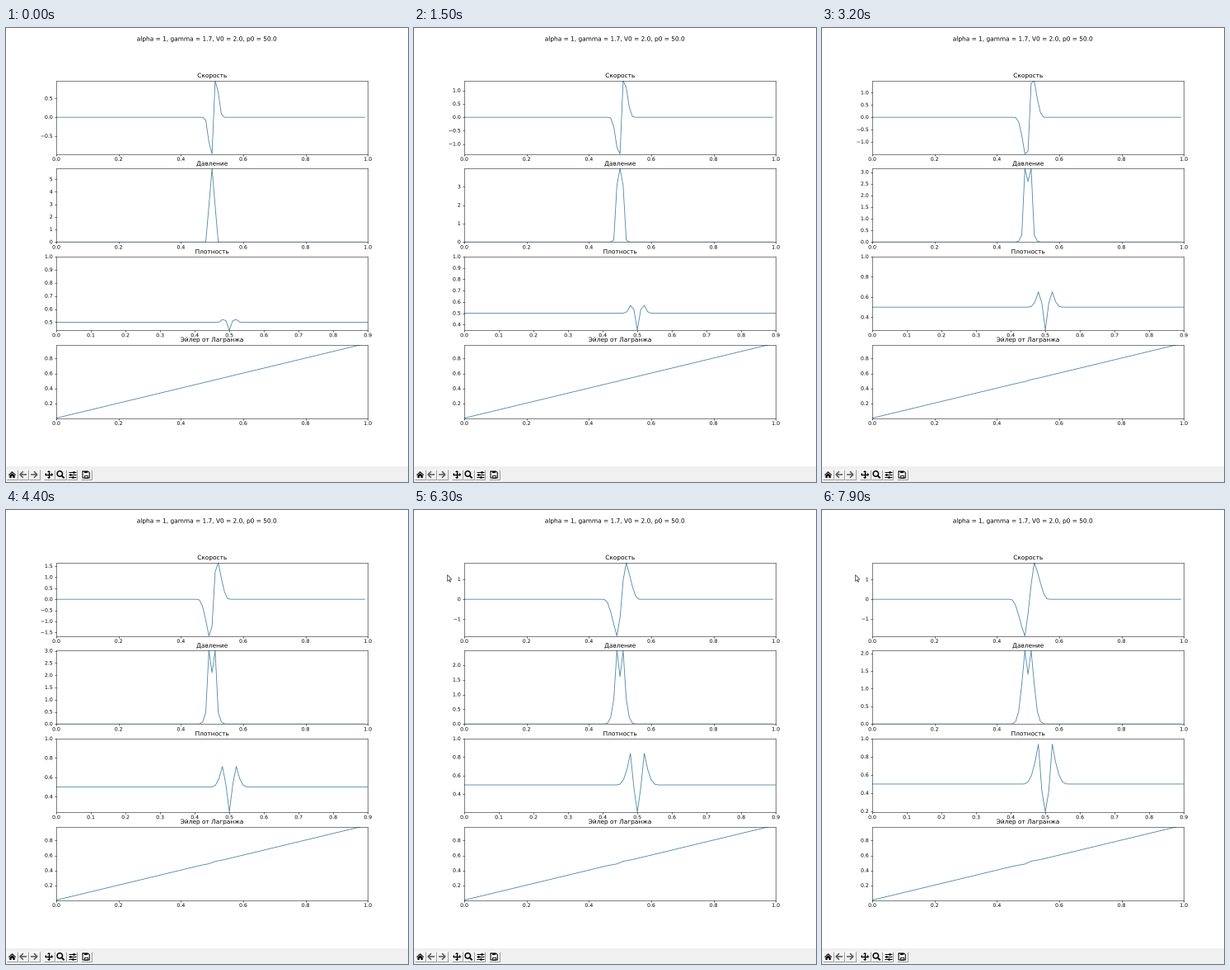
These frames come from a looping animation (488 by 550 pixels, 8000 ms). A matplotlib script:

```python
import numpy as np
import matplotlib.pyplot as plt
from matplotlib import patheffects
from matplotlib.animation import FuncAnimation
from matplotlib.patches import Circle, Polygon, Rectangle

W, H, BAR = 488, 550, 19
DPI = 64
PX = 72 / DPI          # points per pixel
S = 0.6154 * PX        # shrink factor of the plot window
FRAMES, INTERVAL = 80, 100
HOLDS = np.array([2, 8, 20, 37, 43, 62, 69, 73, 77])   # the solver stalls here

# Gas: a small hot spot in the middle of a cold tube
CELLS, DX, V0, GAMMA = 100, 0.01, 2.0, 1.7
VISCOSITY = 4.8
STEP, SUBSTEPS, WARMUP = 9.1e-5, 20, 14

plt.rcParams.update({
    "font.family": "DejaVu Sans", "font.size": 10 * S,
    "axes.titlesize": 12 * S, "axes.titlepad": 6 * S,
    "axes.linewidth": 0.5 * PX, "lines.linewidth": 0.85 * PX,
    "path.effects": [patheffects.Normal()],   # unhinted, sub-pixel text
})
for axis in ("xtick", "ytick"):
    plt.rcParams.update({f"{axis}.major.size": 3.5 * S,
                         f"{axis}.major.pad": 3.5 * S,
                         f"{axis}.major.width": 0.6 * PX})


def simulate(steps):
    """Lagrangian gas dynamics with quadratic artificial viscosity."""
    speed = np.zeros(CELLS + 1)
    volume = np.full(CELLS, V0)
    pressure = np.full(CELLS, 0.003)
    pressure[49:52] = 2.75, 7.25, 2.75
    energy = pressure * volume / (GAMMA - 1)
    k = STEP / SUBSTEPS * V0 / DX
    states = []
    for _ in range(steps):
        euler = np.cumsum(volume) - volume / 2
        states.append((speed[:-1].copy(), pressure, 1 / volume, euler * DX / V0))
        for _ in range(SUBSTEPS):
            squeeze = np.minimum(np.diff(speed), 0)
            total = pressure + VISCOSITY * squeeze ** 2 / volume
            speed[1:-1] -= k * np.diff(total)
            growth = k * np.diff(speed)
            energy = energy - total * growth
            volume = volume + growth
            pressure = (GAMMA - 1) * energy / volume
    return states


states = simulate(WARMUP + FRAMES)

fig = plt.figure(figsize=(W / DPI, H / DPI), dpi=DPI, facecolor="white")
plot_h = H - BAR
axes = fig.subplots(4, 1, gridspec_kw=dict(
    left=0.125, right=0.9, hspace=0.2,
    bottom=(BAR + 0.11 * plot_h) / H, top=(BAR + 0.88 * plot_h) / H))
fig.text(0.5, (BAR + 0.98 * plot_h) / H,
         "alpha = 1, gamma = 1.7, V0 = 2.0, p0 = 50.0",
         size=12 * S, ha="center", va="top")
x = np.arange(CELLS) * DX
lines = []
for ax, title, right in zip(
        axes, ("Скорость", "Давление", "Плотность", "Эйлер от Лагранжа"),
        (1, 1, 0.9, 1)):
    ax.set_title(title)
    ax.set_xlim(0, right)
    lines += ax.plot(x, x, color="#4a86ab")
axes[3].set_ylim(0.005, 0.983)

# Toolbar and pointer live on an overlay in pixel coordinates.
top = fig.add_axes([0, 0, 1, 1], zorder=10)
top.set(xlim=(0, W), ylim=(H, 0))
top.axis("off")


def fill(points, color="black"):
    top.add_patch(Polygon(points, fc=color, ec="none"))


def stroke(xs, ys, color="black", width=1.0):
    top.plot(xs, ys, color=color, lw=width * PX, solid_capstyle="butt")


def draw_toolbar():
    top.add_patch(Rectangle((0, H - BAR), W, BAR, fc="#f0f0f0", ec="none"))
    for left in (1, 14.5, 28, 46, 60, 73.5, 91):
        right = left + 12.5
        stroke([left, left, right], [547, 535, 535], "white", 0.8)
        stroke([right, right, left], [535, 547, 547], "#8c8c8c", 0.8)

    # home
    fill([(3, 541.3), (7.5, 537.2), (12, 541.3), (11.3, 542.1),
          (7.5, 538.7), (3.7, 542.1)])
    fill([(4.3, 542.3), (7.5, 539.4), (10.7, 542.3), (10.7, 545), (8.4, 545),
          (8.4, 542.8), (6.6, 542.8), (6.6, 545), (4.3, 545)])
    # back, forward
    for cx, d in ((20.8, -1), (34, 1)):
        stroke([cx - 4 * d, cx + 3.5 * d], [541, 541], "#555555", 1.5)
        stroke([cx, cx + 3.8 * d, cx], [537.2, 541, 544.8], "#555555", 1.5)
    # pan
    cx, cy = 52, 541
    stroke([cx - 4, cx + 4], [cy, cy], width=1.3)
    stroke([cx, cx], [cy - 4, cy + 4], width=1.3)
    for dx, dy in ((1, 0), (-1, 0), (0, 1), (0, -1)):
        bx, by = cx + 3 * dx, cy + 3 * dy
        fill([(cx + 5 * dx, cy + 5 * dy), (bx + 2 * dy, by + 2 * dx),
              (bx - 2 * dy, by - 2 * dx)])
    # zoom
    top.add_patch(Circle((65.3, 540), 3.2, fc="none", ec="black", lw=1.5 * PX))
    stroke([67.6, 70.6], [542.3, 545.3], width=1.9)
    # sliders
    for y, knob in ((537.8, 82), (541, 77.8), (544.2, 81)):
        stroke([75.5, 84.5], [y, y])
        stroke([knob - 0.9, knob + 0.9], [y, y], width=2.6)
    # save
    stroke([93, 99.5, 101.3, 101.3, 93, 93],
           [537, 537, 538.8, 545, 545, 536.6])
    stroke([95, 99], [538.4, 538.4], width=2)
    stroke([95, 99.4, 99.4, 95, 95], [542.2, 542.2, 545, 545, 542], width=0.8)


draw_toolbar()

ARROW = np.array([(0, 0), (0, 7.8), (1.8, 6.2), (3, 8.8), (4, 8.3),
                  (2.9, 5.8), (5.2, 5.6)])
pointer = top.add_patch(Polygon(ARROW, fc="white", ec="#333333", lw=0.7 * PX))
POINTER_TIMES = (5100, 5300, 5800, 6000)


def update(i):
    t = i * INTERVAL
    data = states[WARMUP + i - np.count_nonzero(HOLDS <= i)]
    for line, values in zip(lines, data):
        line.set_ydata(values)
    speed, pressure, density, _ = data
    axes[0].set_ylim(speed.min(), speed.max())
    axes[1].set_ylim(0, pressure.max())
    axes[2].set_ylim(density.min(), 1)
    pointer.set_visible(t >= POINTER_TIMES[0])
    pointer.set_xy(ARROW + (np.interp(t, POINTER_TIMES, (472, 43, 43, 40.5)),
                            np.interp(t, POINTER_TIMES, (250, 80, 80, 78.5))))
    return lines


anim = FuncAnimation(fig, update, frames=FRAMES, interval=INTERVAL,
                     init_func=lambda: update(0), repeat=True, repeat_delay=0,
                     blit=False)
plt.show()
```
